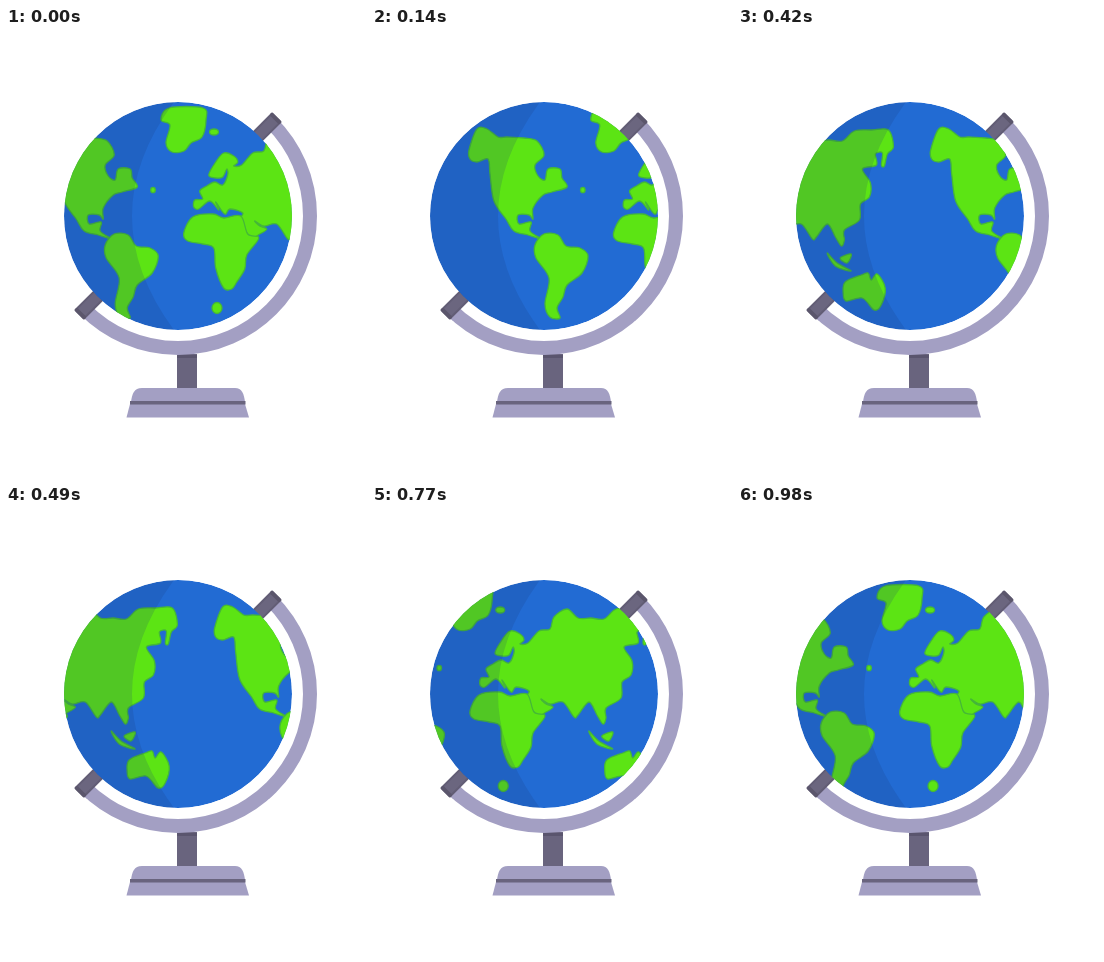
Animation of 360 by 450 pixels, one loop 1.05 s. Source, as an HTML page:

```html
<!DOCTYPE html>
<html lang="en">
<head>
<meta charset="utf-8">
<title>Spinning globe</title>
<style>
  html, body { margin: 0; width: 100%; height: 100%; overflow: hidden; background: #fff; }
  svg { display: block; width: 100%; height: 100%; }
</style>
</head>
<body>
<svg viewBox="0 0 360 450">
  <defs>
    <clipPath id="disc"><circle cx="172" cy="188" r="114"/></clipPath>
    <g id="map" fill="#5ce414" stroke="#45b836" stroke-width="1.3" stroke-linejoin="round"></g>
  </defs>

  <!-- stand -->
  <rect x="171" y="326" width="20" height="35" fill="#69647e"/>
  <rect x="171" y="327" width="20" height="3" fill="#5a556e"/>
  <circle cx="172" cy="188" r="132" fill="none" stroke="#a39fc3" stroke-width="14"
    pathLength="2" stroke-dasharray="1" transform="rotate(-45 172 188)"/>
  <g id="caps" transform="translate(172 188) rotate(-45)" fill="#6b667f" stroke="#5b566c" stroke-linejoin="round">
    <rect x="108" y="-6" width="31" height="12" stroke="#625d75" stroke-width="2"/>
    <rect x="-139" y="-6" width="31" height="12" stroke="#625d75" stroke-width="2"/>
    <path d="M138 -5V5M-138 -5V5" stroke-width="4" stroke-linecap="round"/>
  </g>
  <path d="M125 374C126 366 128 360 136 360H229C236 360 238 366 239 374Z" fill="#a39fc3"/>
  <path d="M124 376H239L243 389.5H120.5Z" fill="#a39fc3"/>
  <rect x="124" y="373" width="115.5" height="3.5" fill="#69647e"/>

  <!-- globe -->
  <g clip-path="url(#disc)">
    <circle cx="172" cy="188" r="114" fill="#226bd3"/>
    <g id="world"></g>
    <path d="M168 74Q84 188 168 302H58V74Z" fill="#1c3a70" opacity=".17"/>
  </g>
</svg>
<script>
const STEP = 15.95, STEPS = 23, LOOP = 1050, HOLD = 70;
const map = document.getElementById('map');
const world = document.getElementById('world');

// Closed smooth curve through "x y" points, placed as seen after some turning steps.
function land(turn, text) {
  const pts = text.split(',').map(p => p.trim().split(' ').map(Number));
  const at = i => pts[(i + pts.length) % pts.length];
  const handle = (i, dir) => at(i).map((v, k) => v + dir * (at(i + 1)[k] - at(i - 1)[k]) / 6);
  const d = 'M' + at(0) + pts.map((p, i) =>
    'C' + [handle(i, 1), handle(i + 1, -1), at(i + 1)].join(' ')).join('') + 'Z';
  map.innerHTML += `<path d="${d}" transform="translate(${-turn * STEP})"/>`;
}

function islet(x, y, rx, ry) {
  map.innerHTML += `<ellipse cx="${x}" cy="${y}" rx="${rx}" ry="${ry}"/>`;
}

function northAmerica() {
  land(4, `98 131,97 122,105 101,115 101,126 109,135 109,152 110,165 113,172 127,163 137,
    166 148,173 152,176 141,188 141,190 150,195 159,180 164,171 167,161 180,161 191,157 187,
    146 187,147 196,159 194,158 203,169 211,156 207,142 203,134 191,122 173,118 146,116 131,105 134`);
}

function southAmerica() {
  land(4, `163 217,172 206,186 207,194 218,208 220,216 228,210 245,195 257,
    191 269,185 280,188 290,178 289,173 276,177 250,164 230`);
}

function eurasia() {
  land(18, `108 179,109 172,117 171,114 163,121 158,129 154,137 157,142 147,141 141,137 149,
    130 150,123 147,130 134,138 125,148 128,152 134,148 138,156 137,167 125,178 123,182 111,
    195 103,206 112,219 112,232 113,244 103,261 102,278 102,283 119,277 126,274 138,271 137,
    272 125,265 126,266 137,252 141,260 155,259 169,250 176,249 192,234 202,234 212,231 218,
    225 209,217 196,206 209,202 211,191 196,178 198,169 193,174 198,181 201,174 206,165 209,
    154 193,157 185,144 181,139 186,130 174,133 182,124 173,113 181`);
}

function africa() {
  land(18, `98 205,107 189,127 186,138 190,155 188,162 206,173 210,161 227,
    159 241,151 254,146 261,138 260,130 240,128 220,117 216,102 213`);
}

function australia() {
  land(14, `169 265,171 254,187 247,194 245,197 252,203 246,211 260,207 277,200 282,188 270,172 273`);
  land(14, `166 230,177 226,173 235`);
  land(14, `153 225,163 235,177 243,161 238`);
}

function greenland() {
  land(0, `163 80,155 92,164 97,160 115,166 124,178 123,185 115,196 109,200 92,197 80`);
  islet(208, 104, 4.5, 3);
  islet(147, 162, 2.3, 2.7);
  islet(211, 280, 5, 5.5);
}

[northAmerica, southAmerica, eurasia, africa, australia, greenland].forEach(f => f());
world.innerHTML = [-1, 0, 1].map(k => `<use href="#map" x="${k * STEP * STEPS}"/>`).join('');

function draw(now) {
  const tick = Math.floor(now % LOOP / HOLD);
  // The globe turns one or two whole steps per tick.
  const turn = Math.floor(tick * 1.56 + 0.9);
  world.setAttribute('transform', `translate(${turn * STEP})`);
  requestAnimationFrame(draw);
}
draw(0);
</script>
</body>
</html>
```
